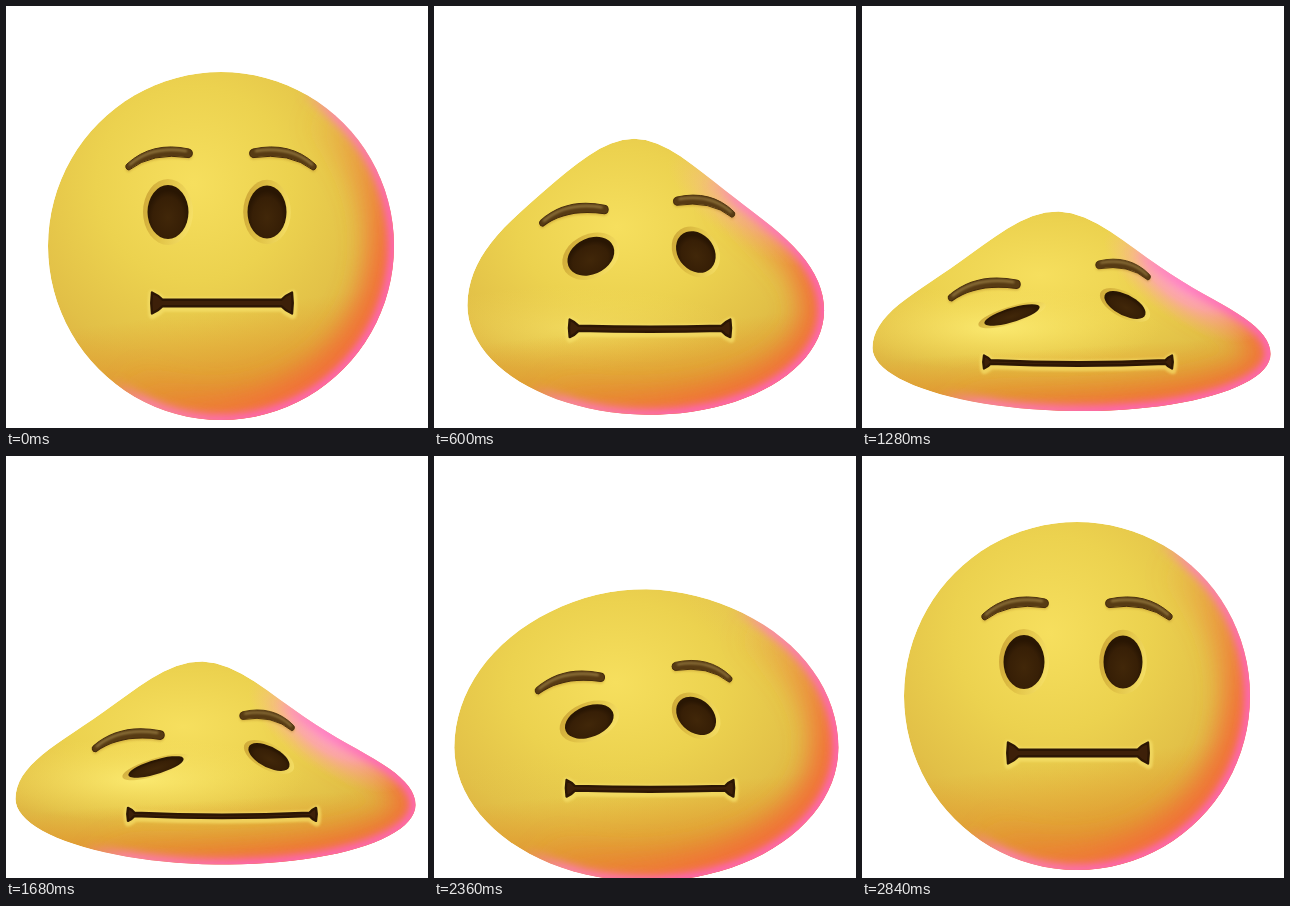
These frames come from a looping animation (422x422 px, 2880 ms). An HTML page:

```html
<!DOCTYPE html>
<html lang="en">
<head>
<meta charset="utf-8">
<title>Melting face</title>
<style>
html, body { margin: 0; width: 100%; height: 100%; overflow: hidden; background: #fff; }
svg { display: block; width: 100%; height: 100%; }
</style>
</head>
<body>
<svg viewBox="0 0 422 422">
  <defs>
    <radialGradient id="skin" cx=".42" cy=".32" r=".7">
      <stop offset="0" stop-color="#f6df5e"/>
      <stop offset=".4" stop-color="#ecd24f"/>
      <stop offset=".72" stop-color="#e2c047"/>
      <stop offset="1" stop-color="#dba83c"/>
    </radialGradient>
    <linearGradient id="warm" x1=".42" y1="0" x2=".55" y2="1">
      <stop offset=".68" stop-color="#e49a2c" stop-opacity="0"/>
      <stop offset=".9" stop-color="#e2922c" stop-opacity=".8"/>
      <stop offset="1" stop-color="#ea8430"/>
    </linearGradient>
    <linearGradient id="orange" x1=".5" y1=".48" x2=".84" y2=".72">
      <stop offset="0" stop-color="#f07a38" stop-opacity="0"/>
      <stop offset="1" stop-color="#f27038"/>
    </linearGradient>
    <linearGradient id="pink" x1=".46" y1=".47" x2=".79" y2=".69">
      <stop offset="0" stop-color="#ff80c0" stop-opacity="0"/>
      <stop offset=".3" stop-color="#ff80c0" stop-opacity=".85"/>
      <stop offset="1" stop-color="#ff66bb"/>
    </linearGradient>
    <radialGradient id="glow">
      <stop offset="0" stop-color="#ff9fcf"/>
      <stop offset=".45" stop-color="#ffa4b8" stop-opacity=".8"/>
      <stop offset="1" stop-color="#f8bd85" stop-opacity="0"/>
    </radialGradient>
    <radialGradient id="light">
      <stop offset="0" stop-color="#fff079"/>
      <stop offset="1" stop-color="#f8e060" stop-opacity="0"/>
    </radialGradient>
    <radialGradient id="pit" cy=".6">
      <stop offset="0" stop-color="#412709"/>
      <stop offset=".75" stop-color="#371f06"/>
      <stop offset="1" stop-color="#291603"/>
    </radialGradient>
    <linearGradient id="lid" x1="0" y1=".3" x2="1" y2=".6">
      <stop offset="0" stop-color="#bd9029"/>
      <stop offset=".45" stop-color="#d9b83f"/>
      <stop offset="1" stop-color="#f8e36e"/>
    </linearGradient>
    <filter id="soft" filterUnits="userSpaceOnUse" x="-60" y="-60" width="542" height="542"><feGaussianBlur stdDeviation="1.2"/></filter>
    <filter id="rimBlur" filterUnits="userSpaceOnUse" x="-60" y="-60" width="542" height="542"><feGaussianBlur stdDeviation="4"/></filter>
    <filter id="wideBlur" filterUnits="userSpaceOnUse" x="-60" y="-60" width="542" height="542"><feGaussianBlur stdDeviation="13"/></filter>
    <clipPath id="clip"><path class="body"/></clipPath>
    <g id="browArt">
      <path d="M-31,5Q-6,-18 31,-10A4.4,4.4 0 0 1 31,-1.4Q-6,-7 -29,11A3.4,3.4 0 0 1 -31,5Z" fill="#b88d2c" opacity=".5" transform="translate(0 2)" filter="url(#soft)"/>
      <path d="M-31,5Q-6,-18 31,-10A4.4,4.4 0 0 1 31,-1.4Q-6,-7 -29,11A3.4,3.4 0 0 1 -31,5Z" fill="#573b14" stroke="#442a0b"/>
      <path d="M-28,5.5Q-6,-13.5 28,-8" fill="none" stroke="#a3874a" stroke-width="2.4" stroke-linecap="round" opacity=".75" filter="url(#soft)"/>
    </g>
    <g id="eyeArt">
      <circle r="1.22" fill="url(#lid)" opacity=".65"/>
      <circle r="1" fill="url(#pit)"/>
    </g>
  </defs>
  <g clip-path="url(#clip)">
    <path class="body" fill="url(#skin)"/>
    <ellipse id="sheen" rx="165" ry="42" fill="url(#light)"/>
    <path class="body" fill="url(#warm)"/>
    <path id="heat" class="body" fill="none" stroke="url(#orange)" filter="url(#wideBlur)"/>
    <ellipse id="flush" rx="92" ry="38" fill="url(#glow)"/>
    <path class="body" fill="none" stroke="url(#pink)" stroke-width="11" filter="url(#rimBlur)"/>
  </g>
  <use id="eyeL" href="#eyeArt"/>
  <use id="eyeR" href="#eyeArt"/>
  <use id="browL" href="#browArt"/>
  <use id="browR" href="#browArt"/>
  <path class="mouth" fill="none" stroke="#f7e26c" stroke-width="8" stroke-linejoin="round" opacity=".65" transform="translate(.5 1.5)" filter="url(#soft)"/>
  <path class="mouth" fill="#3d2009" stroke="#2c1604" stroke-width="2.4" stroke-linejoin="round"/>
</svg>
<script>
const LOOP = 2880, FALL_END = 820, DRIFT_START = 1280, RISE_START = 2090, RISE_END = 2620;

// Each part when calm and when melted
const parts = {
  eyeL: [[162, 206, 20.5, 27, 0], [150, 309, 27, 9, -6]],   // x, y, width, height, skew
  eyeR: [[261, 206, 19.5, 26.5, 0], [263, 299, 20, 13, 5]],
  browL: [[152, 153, 1, 1], [121, 284, 1.08, 1]],           // x, y, scale x, scale y
  browR: [[278, 153, -1, 1], [262, 264, -.82, .9]],
  mouth: [[146, 297, 286, 10.5, 3.2, 0], [122, 356, 310, 6.5, 1.7, 4]]  // left, y, right, cap, line, sag
};

const $ = id => document.getElementById(id);
const clamp = v => Math.min(1, Math.max(0, v));
const lerp = (a, b, k) => a + (b - a) * k;
const mix = ([a, b], k) => a.map((v, i) => lerp(v, b[i], k));
const f = v => v.toFixed(2);

// Collapse speeds up; recovery eases in and out. The parts lead or lag behind.
function stateAt(t) {
  const u = clamp((t - RISE_START) / (RISE_END - RISE_START));
  const drift = clamp((t - DRIFT_START) / (RISE_START - DRIFT_START));
  if (u > 0) {
    const m = 1 - u * u * (3 - 2 * u);
    return { m, wide: m ** .5, crown: m ** 2.2, bell: m ** 4, base: m ** 1.35, face: m ** .8, drift: drift * m };
  }
  const m = clamp(t / FALL_END) ** 1.7;
  return { m, wide: m ** 3, crown: m, bell: 1 - (1 - m) ** 2, base: m, face: m ** 1.6, drift };
}

// Egg with a bell-shaped crown; the angle runs clockwise from the top
function edge(s, angle) {
  const u = Math.sin(angle), c = Math.cos(angle);
  const x = lerp(215, 209.5, s.m) + u * (lerp(173, 199, s.wide) + 2 * s.drift);
  const y = lerp(240, 345, s.m) + 2 * s.drift + 3 * u * s.bell;
  if (c < 0) return [x, y - c * (lerp(174, 60, s.base) + 5 * s.drift)];
  const crown = lerp(174, 75, s.crown) + (2 * s.drift) - 7 * u * s.bell;
  const bell = 64 * s.bell * Math.exp(-(((u + .07) / .5) ** 2)) * Math.sqrt(c);
  return [x, y - c * crown - bell];
}

function outline(s, n = 96) {
  const points = Array.from({ length: n }, (_, i) => edge(s, i * 2 * Math.PI / n).map(f));
  return 'M' + points.join('L') + 'Z';
}

function mouthPath(x0, y, x1, cap, line, sag) {
  const mid = (x0 + x1) / 2;
  const side = (x, dir, h, w) => `${f(x + dir * cap * .6)},${f(y + h * .75)} ${f(x + dir * cap)},${f(y + w)}`;
  return `M${f(x0)},${f(y - cap)}Q${side(x0, 1, -cap, -line)}`
    + `Q${f(mid)},${f(y - line + sag)} ${f(x1 - cap)},${f(y - line)}`
    + `Q${f(x1 - cap * .6)},${f(y - cap * .75)} ${f(x1)},${f(y - cap)}`
    + `Q${f(x1 + 1.5)},${f(y)} ${f(x1)},${f(y + cap)}`
    + `Q${side(x1, -1, cap, line)}`
    + `Q${f(mid)},${f(y + line + sag)} ${f(x0 + cap)},${f(y + line)}`
    + `Q${f(x0 + cap * .6)},${f(y + cap * .75)} ${f(x0)},${f(y + cap)}`
    + `Q${f(x0 - 1.5)},${f(y)} ${f(x0)},${f(y - cap)}Z`;
}

const setAll = (selector, d) => document.querySelectorAll(selector).forEach(p => p.setAttribute('d', d));
const place = (id, ...matrix) => $(id).setAttribute('transform', `matrix(${matrix.map(f)})`);

function draw(t) {
  const s = stateAt(t), sink = 4 * s.drift, melted = s.m * s.bell;
  setAll('.body', outline(s));

  for (const id of ['eyeL', 'eyeR']) {
    const [x, y, w, h, skew] = mix(parts[id], s.face);
    place(id, w, skew, skew, h, x, y + sink);
  }
  for (const id of ['browL', 'browR']) {
    const [x, y, sx, sy] = mix(parts[id], s.face);
    place(id, sx, 0, 0, sy, x, y + sink * .4);
  }
  const [x0, y, x1, ...shape] = mix(parts.mouth, s.face);
  setAll('.mouth', mouthPath(x0, y + sink * 1.2, x1, ...shape));

  $('heat').setAttribute('stroke-width', f(lerp(54, 34, melted)));
  const [fx, fy] = edge(s, Math.PI / 6);
  $('flush').setAttribute('transform', `translate(${f(fx + 12)} ${f(fy + 8)}) rotate(34)`);
  $('flush').setAttribute('opacity', f(melted));
  $('sheen').setAttribute('transform', `translate(135 ${f(322 + sink)})`);
  $('sheen').setAttribute('opacity', f(.75 * melted));
}

const start = performance.now();
function tick() {
  draw((performance.now() - start) % LOOP);
  requestAnimationFrame(tick);
}
draw(0);
requestAnimationFrame(tick);
</script>
</body>
</html>
```
